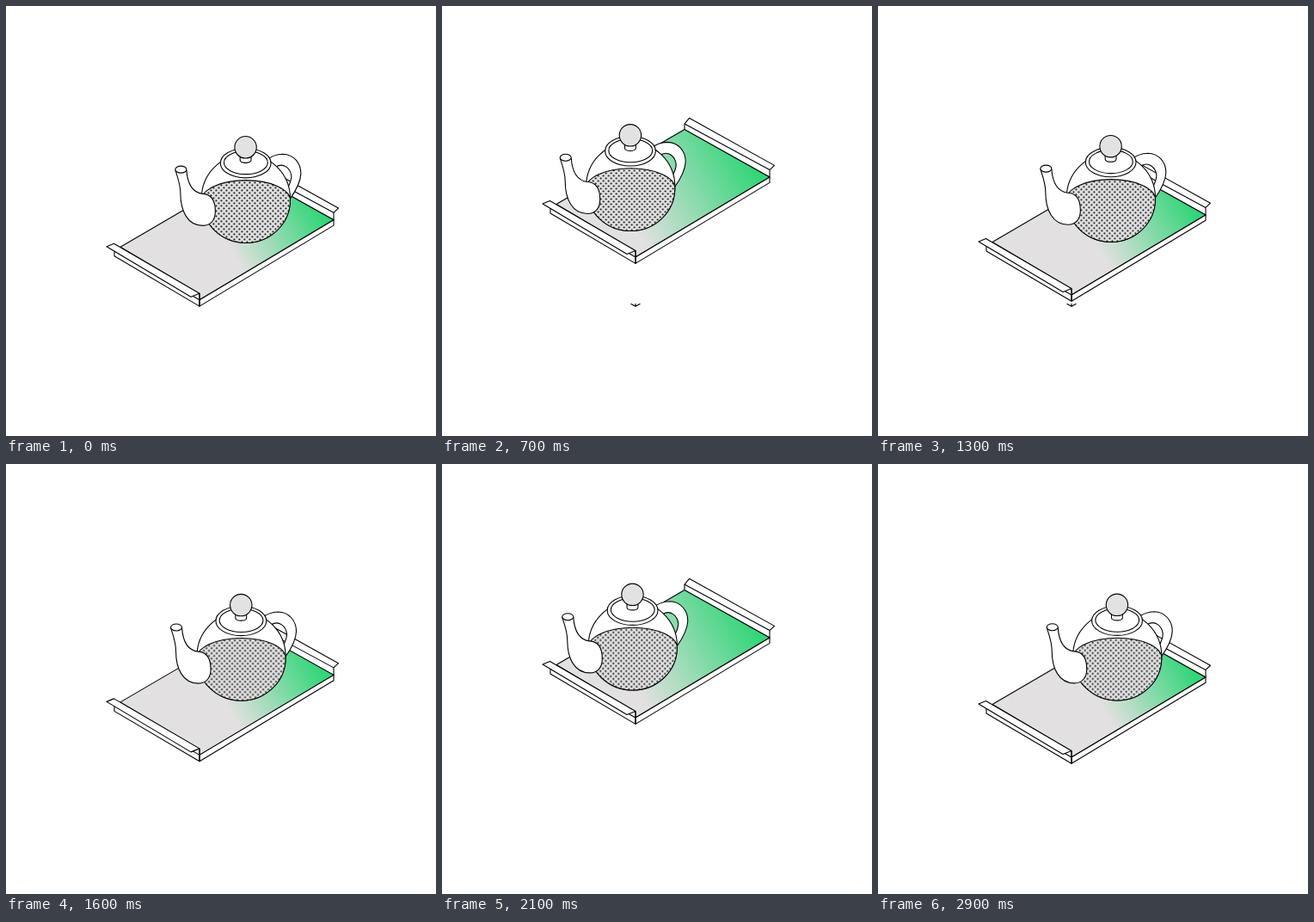
An HTML page for the animation above (3 s loop, 500 by 500 pixels).

```html
<!DOCTYPE html>
<html lang="en">
<head>
<meta charset="utf-8">
<title>Teapot on a tray</title>
<style>
  html, body { margin: 0; width: 100%; height: 100%; overflow: hidden; background: #fff; }
  svg { display: block; width: 100vw; height: 100vh; }
  g { fill: #fff; stroke: #000; stroke-width: 1.1; stroke-linejoin: round; }
  .line { fill: none; }
  .grey { fill: #e3e2e2; }
</style>
</head>
<body>
<svg viewBox="0 0 500 500">
  <defs>
    <linearGradient id="glow" gradientUnits="userSpaceOnUse">
      <stop offset="0" stop-color="#e2e0e0"/>
      <stop offset="1" stop-color="#32d578"/>
    </linearGradient>
    <pattern id="dots" width="6" height="6" patternUnits="userSpaceOnUse">
      <rect width="6" height="6" fill="#e3e2e2"/>
      <circle cx="1.5" cy="1.5" r="1.05"/>
      <circle cx="4.5" cy="4.5" r="1.05"/>
    </pattern>
  </defs>

  <g id="mark">
    <path class="line" d="M219.5 346.3 225 349.3 230.5 346.3M225 346V349"/>
  </g>

  <g id="tray">
    <path d="M282 187 287.5 180.2 386.5 235.3 381 240.5V249L282 194Z"/>
    <path class="line" d="M282 187 381 240.5"/>
    <path fill="url(#glow)" d="M133 280.5 282 193.5 381 249 225 342V335Z"/>
    <path d="M225 342 381 249V255.3L225 349.3Z"/>
    <path d="M126 285 225 342V349.3L126 291Z"/>
    <path d="M117 280 125.5 276.5 225 334.5 215 338.5Z"/>
    <path class="line" d="M225 334.5V349"/>
  </g>

  <g id="pot">
    <path d="M300 181C309 174 316 172.4 322 172.4 335 172.8 343 183 343 195 342.5 207 335 218 330 225L326 215 328.5 210C330 207 332 203 332 198 331 189 323 182 314 187Z"/>
    <circle cx="279" cy="224" r="51.6"/>
    <path fill="url(#dots)" d="M227.4 226A51.6 23.2 0 0 1 330.6 226A51.6 49.6 0 0 1 227.4 226Z"/>
    <ellipse cx="278.8" cy="182.8" rx="29.4" ry="17.2"/>
    <ellipse cx="279" cy="182.2" rx="25.4" ry="13.6"/>
    <path d="M272.3 172V179.5A6.4 3 0 0 0 285.1 179.5V172Z"/>
    <circle class="grey" cx="278.7" cy="164.4" r="12.7"/>
    <path d="M197 191C200 200 203 208 203 218 203 238 211 255.5 229 255.5 239 255.5 243.5 248 243.5 239 243.5 226 238 219 229 218.5 216 217 211 205 210 191Z"/>
    <ellipse cx="203.5" cy="190.3" rx="6.5" ry="4"/>
  </g>
</svg>
<script>
  const LOOP = 3000, HALF = 1500, STEP = 100;
  const AXIS = [0.857, -0.515];
  const $ = id => document.getElementById(id);
  const tray = $('tray'), pot = $('pot'), mark = $('mark'), glow = $('glow');

  // Smooth rise and fall between 0 and size, once per half loop
  const swing = (t, size) => size / 2 * (1 - Math.cos(2 * Math.PI * t / HALF));
  const move = (el, x, y) => el.setAttribute('transform', `translate(${x.toFixed(2)} ${y.toFixed(2)})`);

  function setGlow(from, to) {
    [from, to].forEach((p, i) => {
      glow.setAttribute('x' + (i + 1), AXIS[0] * p);
      glow.setAttribute('y' + (i + 1), AXIS[1] * p);
    });
  }

  function draw(t) {
    const lift = swing(t + 30, 50);
    const slide = swing(t + (t < HALF ? 20 : 46), 60);
    move(tray, 0, -lift);
    move(pot, -slide, slide * 0.6 - lift);
    setGlow(78 - slide * 0.75, 190);
    mark.style.display = t >= 100 && t < 1400 ? '' : 'none';
  }

  const start = performance.now();
  function tick() {
    const t = (performance.now() - start) % LOOP;
    draw(Math.floor(t / STEP) * STEP);
    requestAnimationFrame(tick);
  }
  tick();
</script>
</body>
</html>
```
